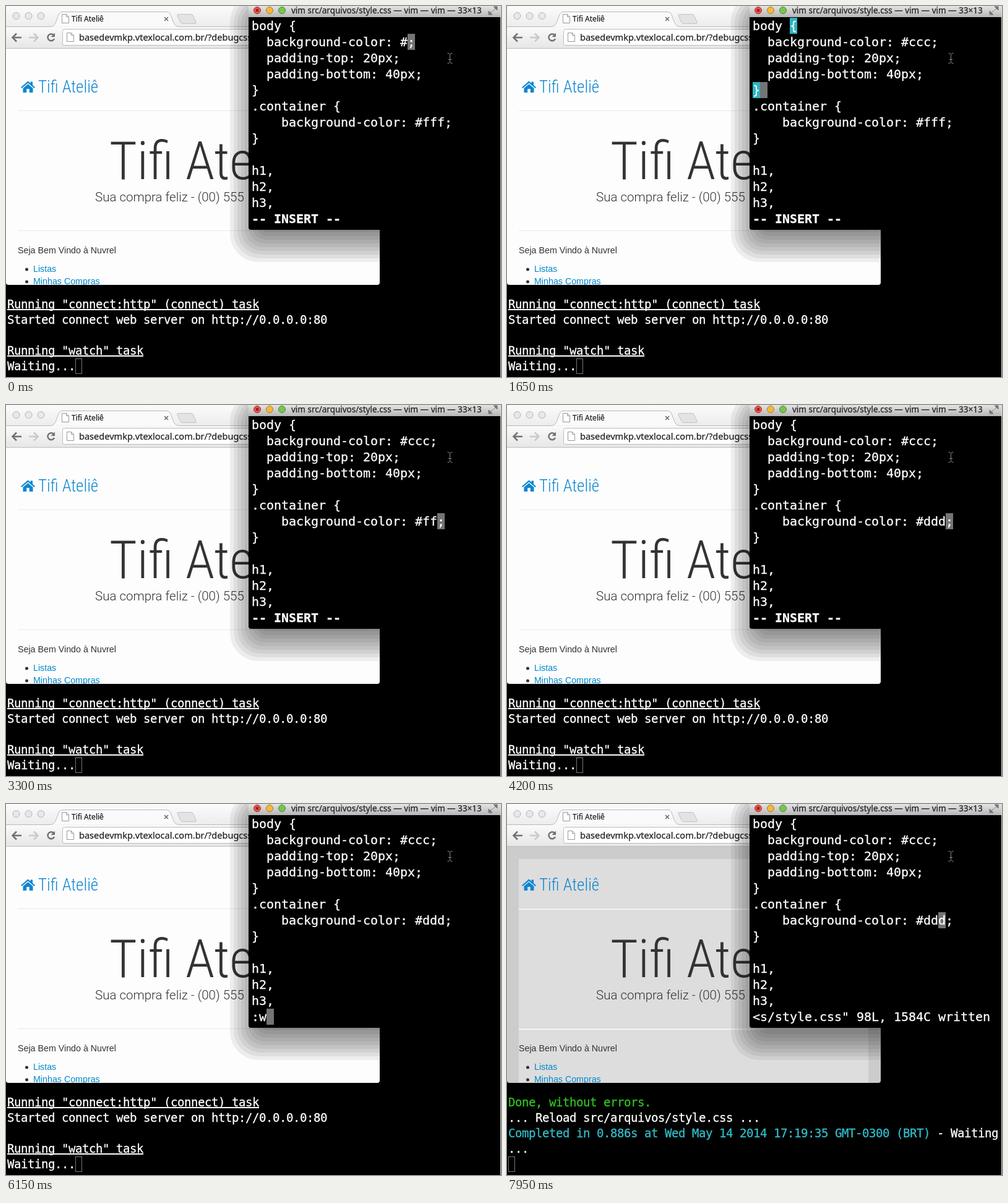
An HTML page for the animation above (8000 ms loop, 800x600 px).

```html
<!DOCTYPE html>
<html lang="pt-BR">
<head>
<meta charset="utf-8">
<title>Live reload</title>
<style>
html, body { margin: 0; width: 100%; height: 100%; overflow: hidden; background: #000; }
#stage { position: relative; width: 800px; height: 600px; overflow: hidden; }
svg { position: absolute; left: 0; top: 0; }
.ui { font-family: "Noto Sans", "Open Sans", sans-serif; fill: #222; stroke: #222; stroke-width: .25px; }
.narrow { font-family: "Roboto Condensed", Roboto, "Open Sans Condensed", sans-serif; font-stretch: 75%; font-weight: 350; }
.body { font: 14.25px "Liberation Sans", Arial, sans-serif; fill: #333; }
.link { fill: #0088cc; }
pre { position: absolute; margin: 0; color: #fff; font-family: "DejaVu Sans Mono", monospace; font-variant-ligatures: none; -webkit-text-stroke: .3px; }
#vim { left: 397px; top: 19px; font-size: 20px; line-height: 26px; letter-spacing: -.04px; }
#term { left: 2px; top: 470px; font-size: 19px; line-height: 25px; letter-spacing: -.44px; }
pre i { font-style: normal; display: inline-block; height: 26px; vertical-align: top; }
.cur { background: #747474; }
.match { background: #2cb5c0; }
#term u { text-decoration-thickness: 2px; text-decoration-skip-ink: none; text-underline-offset: 1px; }
#term .box { width: 11px; height: 25px; box-sizing: border-box; border: 1px solid #777; }
.ok { color: #2fc220; }
.info { color: #2fbecb; }
</style>
</head>
<body>
<div id="stage">
<svg width="800" height="600" viewBox="0 0 800 600">
  <defs>
    <linearGradient id="strip" x2="0" y2="1"><stop stop-color="#fbfbfb"/><stop offset="1" stop-color="#ececec"/></linearGradient>
    <linearGradient id="bar" x2="0" y2="1"><stop stop-color="#fafafa"/><stop offset="1" stop-color="#e6e6e6"/></linearGradient>
    <linearGradient id="title" x2="0" y2="1"><stop stop-color="#e4e4e4"/><stop offset="1" stop-color="#b6b6b6"/></linearGradient>
    <clipPath id="win"><path d="M0 0H604V447Q604 451 600 451H4Q0 451 0 447Z"/></clipPath>
    <g id="sheet" fill="#fff" stroke="#999"><path d="M.5.5H7.5L11.5 4.5V14.5H.5Z"/><path d="M7.5.5V4.5H11.5" fill="none"/></g>
  </defs>

  <g clip-path="url(#win)">
    <rect id="page" y="69" width="604" height="382" fill="#fdfdfd"/>
    <rect id="container" x="19" y="89" width="565" height="362" fill="#fdfdfd"/>
    <g id="rules"></g>
    <path d="M24 131.5L35.5 121.5L39.5 125V122.5H43V128L47 131.5L45.5 133L35.5 124.5L25.5 133Z
             M27.5 133L35.5 126.3L43.5 133V140H37.8V134H33.2V140H27.5Z" fill="#0c86d2"/>
    <text class="narrow" x="52" y="140" font-size="27" fill="#0c86d2">Tifi Ateliê</text>
    <text class="narrow" x="167" y="280" font-size="86" fill="#333">Tifi Ateliê</text>
    <text x="144" y="316" font-family="Roboto, sans-serif" font-weight="300" font-size="20.5" fill="#333">Sua compra feliz - (00) 555</text>
    <text class="body" x="19" y="400">Seja Bem Vindo à Nuvrel</text>
    <circle cx="33.5" cy="426" r="2.5" fill="#333"/>
    <circle cx="33.5" cy="446" r="2.5" fill="#333"/>
    <text class="body link" x="44" y="430">Listas</text>
    <text class="body link" x="44" y="450">Minhas Compras</text>

    <rect width="604" height="34" fill="url(#strip)"/>
    <rect y="34" width="604" height="35" fill="url(#bar)"/>
    <path d="M0 68.5H604" stroke="#bdbdbd"/>
    <g fill="#e8e8e8" stroke="#b2b2b2">
      <circle cx="16.5" cy="16" r="5.5"/><circle cx="36.5" cy="16" r="5.5"/><circle cx="56.5" cy="16" r="5.5"/>
    </g>
    <path d="M0 33.5H70C77 33.5 79 30 81 25L85 14Q87 9.5 92 9.5H259Q264 9.5 266 14L270 25C272 30 274 33.5 281 33.5H604" fill="#fafafa" stroke="#b9b9b9"/>
    <path d="M279 13.5H299Q301 13.5 302 15L307 26Q308 28.5 305 28.5H286Q283 28.5 282 26L277 16Q276 13.5 279 13.5Z" fill="#e3e3e3" stroke="#c2c2c2"/>
    <use href="#sheet" x="90" y="13"/>
    <text class="ui" x="106" y="25" font-size="12">Tifi Ateliê</text>
    <path d="M256 18L262 24M262 18L256 24" stroke="#666" stroke-width="1.5"/>
    <g fill="none" stroke-width="2.5">
      <path d="M25 51H11M17 44.5L10.5 51L17 57.5" stroke="#727272"/>
      <path d="M37 51H51M45 44.5L51.5 51L45 57.5" stroke="#c9c9c9"/>
      <path d="M77 47A5.5 5.5 0 1 0 78 53" stroke="#727272"/>
    </g>
    <path d="M79 43.5V50H72.5Z" fill="#727272"/>
    <rect x="91.5" y="37.5" width="520" height="26" rx="3" fill="#fff" stroke="#bbb"/>
    <use href="#sheet" x="98" y="43"/>
    <text class="ui" x="118" y="56" font-size="14.56">basedevmkp.vtexlocal.com.br/?debugcss</text>
    <g id="shadow"></g>
  </g>

  <path d="M392 0H800V362H396Q392 362 392 358Z"/>
  <rect x="392" width="408" height="18" fill="url(#title)"/>
  <circle cx="406" cy="7" r="5.5" fill="#f0524b" stroke="#a8322d"/>
  <circle cx="426" cy="7" r="5.5" fill="#f3b83f" stroke="#ac7d25"/>
  <circle cx="446" cy="7" r="5.5" fill="#76c552" stroke="#4b8a31"/>
  <path d="M404 5L408 9M408 5L404 9" stroke="#701a16" stroke-width="1.5"/>
  <text class="ui" x="461" y="12" font-size="13.5">vim src/arquivos/style.css — vim — vim — 33×13</text>
  <path d="M788 1H794V7ZM780 8V14H786ZM791 4L787.5 7.5M783 11L786.5 7.5" fill="#777" stroke="#777"/>
  <rect x="799" width="1" height="600" fill="#ddd"/>
</svg>
<pre id="vim"></pre>
<pre id="term"></pre>
<svg width="800" height="600" viewBox="0 0 800 600">
  <path d="M713.5 76.5H716L717.5 78L719 76.5H721.5M717.5 78V91M713.5 92.5H716L717.5 91L719 92.5H721.5M715 86.5H720" fill="none" stroke="#858585"/>
</svg>
</div>
<script>
const $ = id => document.getElementById(id);
const LOOP = 8000;

$('rules').innerHTML = [169, 363].map(y =>
  `<path d="M19 ${y + .5}H584" stroke="#e8e8e8"/><path d="M19 ${y + 1.5}H584" stroke="#fff"/>`).join('');

// Stepped window shadow
$('shadow').innerHTML = Array.from({ length: 9 }, (_, i) => {
  const top = -20 + 5 * i;
  return `<rect x="${362 + 6 * i}" y="${top}" width="500" height="${414 - 6 * i - top}" rx="${46 - 4 * i}" opacity=".062"/>`;
}).join('');

const INSERT = '-- INSERT --';
const WRITTEN = '&lt;s/style.css" 98L, 1584C written';

// [time, body colour, container colour, cursor row, cursor column, status, matched brackets]
const edits = [
  [0, '', 'fff', 1, 21, INSERT],
  [600, 'c', 'fff', 1, 22, INSERT],
  [750, 'cc', 'fff', 1, 23, INSERT],
  [900, 'ccc', 'fff', 1, 24, INSERT],
  [1200, 'ccc', 'fff', 2, 20, INSERT],
  [1500, 'ccc', 'fff', 3, 23, INSERT],
  [1650, 'ccc', 'fff', 4, 1, INSERT, [[0, 5], [4, 0]]],
  [1800, 'ccc', 'fff', 5, 12, INSERT, [[5, 11], [7, 0]]],
  [2100, 'ccc', 'fff', 6, 24, INSERT],
  [2400, 'ccc', 'fff', 6, 25, INSERT],
  [2700, 'ccc', 'fff', 6, 26, INSERT],
  [3300, 'ccc', 'ff', 6, 25, INSERT],
  [3450, 'ccc', 'f', 6, 24, INSERT],
  [3600, 'ccc', '', 6, 23, INSERT],
  [3900, 'ccc', 'd', 6, 24, INSERT],
  [4050, 'ccc', 'dd', 6, 25, INSERT],
  [4200, 'ccc', 'ddd', 6, 26, INSERT],
  [5250, 'ccc', 'ddd', 6, 25, ''],
  [5850, 'ccc', 'ddd', 12, 1, ':'],
  [6150, 'ccc', 'ddd', 12, 2, ':w'],
  [6750, 'ccc', 'ddd', 6, 25, WRITTEN]
];

const box = '<i class="box"></i>';
const logs = [
  [0, `<u>Running "connect:http" (connect) task</u>
Started connect web server on http://0.0.0.0:80

<u>Running "watch" task</u>
Waiting...${box}`],
  [7050, `<u>Running "watch" task</u>
Waiting...<span class="ok">OK</span>
<span class="ok">&gt;&gt;</span> File "src/arquivos/style.css" changed.

${box}`],
  [7950, `<span class="ok">Done, without errors.</span>
... Reload src/arquivos/style.css ...
<span class="info">Completed in 0.886s at Wed May 14 2014 17:19:35 GMT-0300 (BRT)</span> - Waiting
...
${box}`]
];

const latest = (list, t) => list.filter(e => e[0] <= t).pop();

function drawVim([, body, inner, row, col, status, pairs = []]) {
  const lines = ['body {', `  background-color: #${body};`, '  padding-top: 20px;',
    '  padding-bottom: 40px;', '}', '.container {', `    background-color: #${inner};`,
    '}', '', 'h1,', 'h2,', 'h3,', status === INSERT ? `<b>${status}</b>` : status];
  const mark = (r, c, cls) => {
    const s = lines[r];
    lines[r] = s.slice(0, c) + `<i class="${cls}">${s[c] || '&nbsp;'}</i>` + s.slice(c + 1);
  };
  mark(row, col, 'cur');
  pairs.forEach(([r, c]) => mark(r, c, 'match'));
  $('vim').innerHTML = lines.join('\n');
}

let edit, log;
function frame(now) {
  const t = now % LOOP;
  const nextEdit = latest(edits, t), nextLog = latest(logs, t);
  if (nextEdit !== edit) drawVim(edit = nextEdit);
  if (nextLog !== log) {
    log = nextLog;
    $('term').innerHTML = log[1];
    const reloaded = log === logs[2];
    $('page').setAttribute('fill', reloaded ? '#ccc' : '#fdfdfd');
    $('container').setAttribute('fill', reloaded ? '#ddd' : '#fdfdfd');
  }
  requestAnimationFrame(() => frame(performance.now()));
}
frame(performance.now());
</script>
</body>
</html>
```
